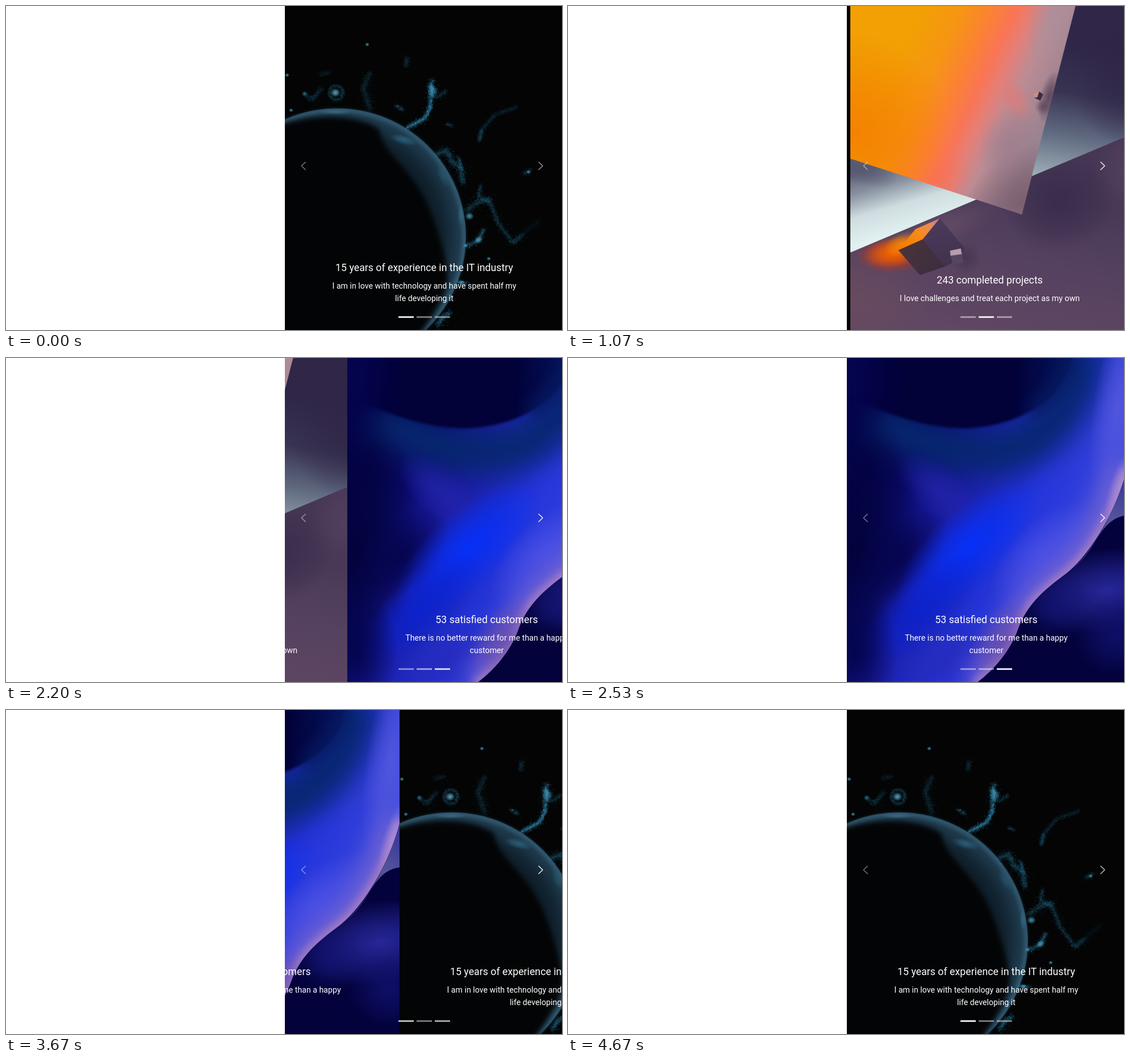
An HTML page with a canvas that plays this animation: 979 by 572 pixels, repeating every 4.74 s.

```html
<!DOCTYPE html>
<html lang="en">
<head>
<meta charset="utf-8">
<title>Carousel</title>
<style>
  html, body { margin: 0; width: 100%; height: 100%; overflow: hidden; background: #fff; }
  #panel { position: absolute; left: 491px; top: 0; width: 488px; height: 572px; overflow: hidden; background: #040404; }
  .slide { position: absolute; left: 0; top: 0; width: 492px; height: 572px; overflow: hidden; }
  .slide canvas { position: absolute; left: 0; top: 0; }
  .caption { position: absolute; left: 0; bottom: 44.8px; width: 491px; color: #fff; text-align: center; white-space: nowrap; font: 14.2px/21.6px Roboto, sans-serif; }
  .caption b { display: block; margin-bottom: 10px; font: 17.75px/24px Roboto, sans-serif; }
  #ui { position: absolute; left: 0; top: 0; }
</style>
</head>
<body>
<div id="panel">
  <div class="slide"><canvas width="492" height="572"></canvas>
    <div class="caption"><b>15 years of experience in the IT industry</b>I am in love with technology and have spent half my<br>life developing it</div></div>
  <div class="slide"><canvas width="492" height="572"></canvas>
    <div class="caption"><b>243 completed projects</b>I love challenges and treat each project as my own</div></div>
  <div class="slide"><canvas width="492" height="572"></canvas>
    <div class="caption"><b>53 satisfied customers</b>There is no better reward for me than a happy<br>customer</div></div>
  <svg id="ui" width="488" height="572" viewBox="491 0 488 572">
    <g fill="none" stroke="#fff" stroke-width="1.25" stroke-linecap="round" stroke-linejoin="round">
      <path d="M527.3 275.5L520.3 282.3L527.3 289" opacity=".5"/>
      <path id="next" d="M938 275.5L945 282.3L938 289"/>
    </g>
    <g fill="#fff">
      <rect class="dot" x="691" y="547.8" width="27" height="2.7"/>
      <rect class="dot" x="723" y="547.8" width="27" height="2.7"/>
      <rect class="dot" x="755" y="547.8" width="27" height="2.7"/>
    </g>
  </svg>
</div>
<script>
const LOOP = 4740, TICK = 200 / 3, WIDTH = 492;
const MOVES = [[554, 600], [1923, 583], [3462, 600]];   // start, duration
const slides = [...document.querySelectorAll('.slide')];
const dots = [...document.querySelectorAll('.dot')];
const next = document.getElementById('next');
let c;

/* ---------- drawing helpers ---------- */
let seed = 7;
function rnd() {
  seed = (seed * 16807) % 2147483647;
  return seed / 2147483647;
}
const gauss = () => rnd() + rnd() + rnd() - 1.5;

function begin(i, originX) {
  c = slides[i].querySelector('canvas').getContext('2d');
  c.translate(-originX, 0);
}

function linear(x1, y1, x2, y2, ...stops) {
  const g = c.createLinearGradient(x1, y1, x2, y2);
  for (const [at, color] of stops) g.addColorStop(at, color);
  return g;
}

function shape(d, fill) {
  c.fillStyle = fill;
  c.fill(new Path2D(d));
}

function blob(x, y, rx, ry, color, alpha = 1, angle = 0) {
  const g = c.createRadialGradient(0, 0, 0, 0, 0, 1);
  g.addColorStop(0, color);
  g.addColorStop(.45, color + 'a0');
  g.addColorStop(1, color + '00');
  c.save();
  c.globalAlpha = alpha;
  c.translate(x, y);
  c.rotate(angle * Math.PI / 180);
  c.scale(rx, ry);
  c.fillStyle = g;
  c.fillRect(-1, -1, 2, 2);
  c.restore();
}

function soft(blur, draw) {
  c.save();
  c.filter = `blur(${blur}px)`;
  draw();
  c.restore();
}

function clipped(d, draw) {
  c.save();
  c.clip(new Path2D(d));
  draw();
  c.restore();
}

function line(d, color, width) {
  c.strokeStyle = color;
  c.lineWidth = width;
  c.stroke(new Path2D(d));
}

// Dusty glowing trail along a polyline of x,y pairs.
function wisp(pts, spread, glow) {
  const n = pts.length / 2 - 1;
  soft(2.4, () => {
    c.globalAlpha = glow * .75;
    c.lineJoin = c.lineCap = 'round';
    line('M' + pts.join(' '), '#2c86ae', spread * .7);
  });
  for (let k = 0; k < n; k++) {
    const [x, y, x2, y2] = pts.slice(k * 2, k * 2 + 4);
    const count = Math.hypot(x2 - x, y2 - y) * spread;
    for (let j = 0; j < count; j++) {
      const u = rnd(), wide = spread * (j % 3 ? 1 : 2.2);
      c.fillStyle = `rgba(60,155,198,${(glow * rnd() * .7).toFixed(3)})`;
      c.fillRect(x + (x2 - x) * u + gauss() * wide, y + (y2 - y) * u + gauss() * wide, 1.2, 1.2);
    }
  }
}

/* ---------- slide art ---------- */
function drawPlanet() {
  begin(0, 491);
  c.fillStyle = '#040404';
  c.fillRect(491, 0, 492, 572);
  const disc = 'M356 407.5a227 227 0 1 0 454 0a227 227 0 1 0 -454 0Z';
  soft(2, () => line(disc, '#0d2431', 2));
  clipped(disc, () => {
    const g = c.createRadialGradient(583, 407.5, 150, 583, 407.5, 227);
    g.addColorStop(0, '#0a161f');
    g.addColorStop(.5, '#122431');
    g.addColorStop(.85, '#1e3a4c');
    g.addColorStop(.96, '#30566c');
    g.addColorStop(1, '#27485b');
    c.fillStyle = g;
    c.fillRect(356, 180, 454, 455);
    soft(5, () => shape('M440 228C520 185 620 190 657 218C664 262 716 290 742 350C763 400 774 440 778 480C768 530 740 560 710 610H440Z', '#030405'));
    blob(700, 236, 26, 9, '#2d6b88', .75, 15);
    blob(580, 187, 30, 5, '#4a7c98', .55);
    blob(770, 300, 9, 22, '#2b6480', .5, -25);
    blob(801, 370, 6, 20, '#36708a', .6);
  });

  wisp([706, 215, 735, 200, 747, 178, 746, 150, 750, 130], 4.5, .8);
  wisp([706, 215, 722, 205, 738, 197, 746, 180, 748, 165], 2.5, 1);
  wisp([757, 162, 775, 150], 4, .4);
  wisp([744, 140, 757, 148, 752, 160], 5, .7);
  wisp([525, 155, 540, 165, 556, 145], 6, .3);
  wisp([552, 120, 570, 117], 5, .25);
  wisp([640, 118, 629, 145, 641, 182], 9, .24);
  wisp([706, 90, 704, 106], 5, .4);
  wisp([685, 175, 700, 184], 3, .65);
  wisp([775, 208, 786, 212], 2, .8);
  wisp([900, 178, 860, 192, 840, 215, 833, 238], 5, .25);
  wisp([837, 218, 833, 238], 4, .5);
  wisp([758, 262, 776, 254, 785, 275, 800, 285, 805, 312], 8, .45);
  wisp([797, 268, 802, 288], 4, .7);
  wisp([910, 296, 925, 289], 4, .45);
  wisp([836, 316, 832, 336, 852, 346, 866, 382, 893, 418, 910, 404], 5, .42);
  wisp([900, 410, 938, 380], 7, .12);
  wisp([811, 362, 832, 345, 852, 342], 8, .36);
  wisp([809, 424, 830, 415, 841, 395], 5, .75);
  wisp([793, 487, 812, 490], 4, .75);
  wisp([760, 564, 768, 550, 782, 541], 6, .7);
  for (let a = 0; a < 6.2; a += .5)
    wisp([581 + 12 * Math.cos(a), 153 + 13 * Math.sin(a), 581 + 12 * Math.cos(a + .5), 153 + 13 * Math.sin(a + .5)], 3, .5);
  blob(580, 153, 9, 8, '#5fb4d2', .9);
  blob(750, 150, 6, 15, '#4aa4c8', .8);
  blob(816, 371, 8, 7, '#459cc0', .9);
  blob(832, 413, 9, 6, '#459cc0', .9, -30);
  blob(802, 488, 6, 4, '#459cc0');
  blob(526, 155, 5, 5, '#2f80a0', .8);
  for (const [x, y] of [[636, 68], [502, 184], [495, 122], [850, 446], [920, 293], [809, 423]])
    blob(x, y, 4, 3.5, '#459cc0', .9);
}

function drawBlocks() {
  begin(1, 487.5);
  c.fillStyle = linear(840, 60, 800, 305, [0, '#2f2648'], [.35, '#393452'], [.65, '#606a80'], [1, '#a4b5bd']);
  c.fillRect(487, 0, 493, 572);
  blob(985, 130, 110, 120, '#302647', .8);
  shape('M487 262L740 345L487 440Z', linear(545, 280, 580, 398, [0, '#616378'], [.3, '#8a93a2'], [.62, '#cfdde0'], [1, '#e1f0f0']));
  blob(500, 285, 75, 30, '#54566f', .8, 18);

  const floor = 'M487 435.5L980 227.5V572H487Z';
  shape(floor, linear(760, 300, 700, 572, [0, '#463755'], [.45, '#544160'], [1, '#604763']));
  clipped(floor, () => {
    blob(855, 345, 100, 90, '#382b4b', .9, -20);
    blob(975, 290, 60, 80, '#584462', .6);
    blob(500, 520, 130, 100, '#6b4c5d', .7);
    blob(640, 395, 120, 36, '#75566c', .5, -22);
    blob(560, 440, 64, 32, '#d23312', .95);
    blob(566, 434, 56, 27, '#f06a00', 1, -10);
    blob(580, 420, 34, 20, '#f88a05', .9, -20);
    blob(690, 445, 28, 28, '#41334f', .7);
  });

  const wall = 'M487 0H884L789.5 368L487 269Z';
  shape(wall, linear(600, 34, 855, 155, [0, '#f2a004'], [.22, '#f69612'], [.38, '#fb8430'], [.53, '#fa7556'], [.64, '#e3807a'], [.76, '#bc8c94'], [1, '#9b8391']));
  clipped(wall, () => {
    blob(500, 220, 160, 170, '#f57b00', .8);
    blob(645, 305, 60, 40, '#f96f50', .5, -40);
    blob(778, 165, 26, 45, '#f0726c', .5, -25);
    blob(790, 345, 130, 85, '#785c6c', .9, -40);
    blob(765, 245, 50, 70, '#94788a', .55, 20);
    blob(845, 20, 45, 90, '#a4909f', .6, 15);
    blob(838, 160, 17, 48, '#574257', .9, 14);
    blob(826, 178, 14, 14, '#58435a', .7);
  });
  shape('M810 154L820 151L817 162L811 162Z', '#cc8d7e');
  shape('M820 151L827 156L822 167L811 162L817 161Z', '#3a2b46');

  shape('M572 431L602 394L645 375L615 412Z', linear(580, 430, 642, 380, [0, '#f47c00'], [.5, '#f98a18'], [.8, '#e88a5c'], [1, '#b98382']));
  shape('M572 431L615 412L654 460L610 475Z', linear(580, 420, 640, 470, [0, '#4a333b'], [1, '#3d2e3f']));
  shape('M645 375L689 428L680 447L654 460L615 412Z', linear(640, 385, 665, 455, [0, '#4a3a5a'], [1, '#41324f']));
  shape('M664 441L684 438L687 453L668 457Z', '#564460');
  shape('M663 432L682 428L684 438L664 441Z', '#b59eac');
}

function drawWaves() {
  begin(2, 491);
  c.fillStyle = '#03023d';
  c.fillRect(491, 0, 492, 572);
  const edge = 'M984 196C968 262 926 340 878 380C835 412 808 436 792 480C778 520 745 556 716 576';
  const body = edge + 'H485V-5H984Z';
  clipped(body, () => {
    c.fillStyle = linear(540, 170, 950, 370, [0, '#04034a'], [.18, '#0c0c74'], [.36, '#1a1da4'], [.6, '#2232d4'], [1, '#5058e0']);
    c.fillRect(485, 0, 500, 572);
    soft(24, () => line('M545 105C620 160 740 185 810 150C870 115 895 60 910 -20', '#07276e', 75));
    blob(505, 340, 110, 240, '#03023c', 1, 8);
    blob(585, 350, 105, 62, '#04034a', .9, -45);
    blob(655, 235, 90, 45, '#2426ac', .75, 40);
    blob(968, 90, 45, 190, '#5559de', .85, 8);
    blob(835, 265, 150, 60, '#2536e0', .6, -45);
    blob(705, 335, 160, 68, '#0630f8', 1, -42);
    blob(620, 445, 140, 58, '#0a22d0', .85, -42);
    blob(835, 345, 120, 55, '#4c52e8', .8, -45);
    blob(670, 530, 110, 55, '#2829b8', .75, -35);
    blob(505, 520, 75, 120, '#03034a', .9);
    soft(20, () => line(edge, 'rgba(126,104,208,.85)', 56));
    soft(7, () => line(edge, 'rgba(184,138,190,.75)', 15));
    blob(972, 225, 18, 70, '#c8a8dc', .4, 18);
    blob(765, 500, 50, 80, '#684aa4', .7, 30);
    soft(2, () => shape('M485 62C560 100 630 124 700 124C765 122 815 100 850 68C876 40 886 15 889 -10H485Z',
      linear(500, 0, 880, 40, [0, '#04034e'], [.25, '#020138'], [.75, '#020138'], [1, '#05145e'])));
    soft(12, () => line('M890 -10C876 38 850 70 815 96', '#06195f', 24));
    blob(500, 20, 50, 100, '#05044e', .7);
  });

  shape('M984 196C968 262 926 340 888 372L984 330Z', linear(979, 230, 925, 330, [0, '#3c3c9c'], [.5, '#54549a'], [1, '#4a3c86']));
  const hump = 'M984 278C955 281 942 302 926 328C912 351 897 366 878 380C835 412 808 436 792 480C778 520 745 556 716 576H984Z';
  shape(hump, '#03023c');
  clipped(hump, () => {
    blob(950, 410, 150, 75, '#262698', 1, -8);
    blob(860, 440, 70, 60, '#15157a', .6, -40);
    blob(965, 490, 75, 70, '#14147a', .7);
    blob(800, 535, 100, 70, '#03023a', .9, -30);
  });
}

/* ---------- motion ---------- */
// CSS "ease" curve: cubic-bezier(.25, .1, .25, 1)
function ease(x) {
  if (x <= 0) return 0;
  if (x >= 1) return 1;
  const bez = (s, a, b) => 3 * (1 - s) * (1 - s) * s * a + 3 * (1 - s) * s * s * b + s * s * s;
  let lo = 0, hi = 1;
  for (let i = 0; i < 24; i++) {
    const mid = (lo + hi) / 2;
    if (bez(mid, .25, .25) < x) lo = mid; else hi = mid;
  }
  return bez(lo, .1, 1);
}

function render(ms) {
  const t = Math.floor((ms % LOOP + 5) / TICK) * TICK;
  const x = [0, WIDTH + 8, WIDTH + 8], lit = [1, .5, .5];
  MOVES.forEach(([start, span], from) => {
    if (t < start) return;
    const to = (from + 1) % 3, p = ease((t - start) / span);
    x.fill(WIDTH + 8);
    lit.fill(.5);
    x[from] = -WIDTH * p;
    x[to] = WIDTH * (1 - p);
    lit[from] = 1 - p / 2;
    lit[to] = .5 + p / 2;
  });
  slides.forEach((el, i) => {
    el.style.transform = `translateX(${x[i].toFixed(2)}px)`;
    dots[i].setAttribute('opacity', lit[i].toFixed(3));
  });
  next.setAttribute('opacity', t > 4660 ? .8 : Math.min(1, .62 + t / 267 * .38));
}

drawPlanet();
drawBlocks();
drawWaves();
const t0 = performance.now();
function frame() {
  render(performance.now() - t0);
  requestAnimationFrame(frame);
}
frame();
</script>
</body>
</html>
```
